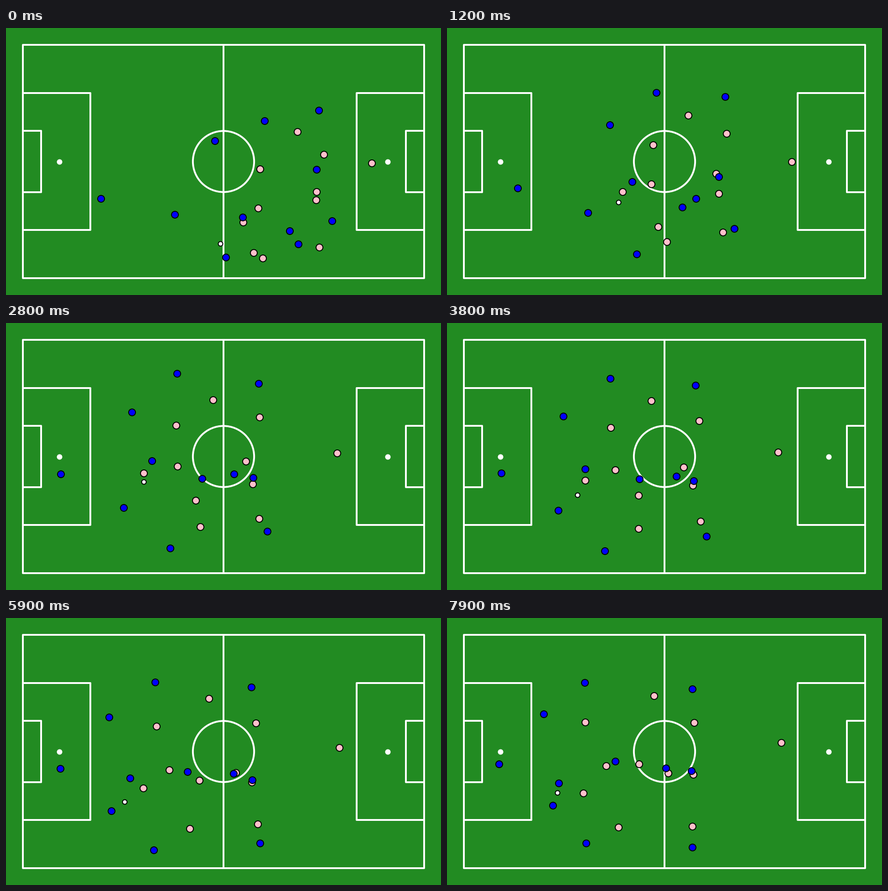
These frames come from a looping animation (954x587 px, 8 s). A matplotlib script:

```python
import matplotlib.pyplot as plt
import numpy as np
from matplotlib.animation import FuncAnimation
from matplotlib.patches import Circle, Rectangle

W, H, DPI = 954, 587, 64
PX = 72 / DPI  # points per pixel
FRAMES, STEP = 80, 100
KEYS = np.array([0, 18, 46, 79])
GRASS = "forestgreen"

span = np.diff(KEYS)
frame = np.arange(FRAMES)
seg = np.clip(np.searchsorted(KEYS, frame, side="right") - 1, 0, 2)
u = (frame - KEYS[seg]) / span[seg]

# everyone sways together: a little back, then forward
sway = np.array([0, -3, 5.5])[seg] * np.sin(np.pi * u)


def path(*points):
    """Smooth motion through four points, one per key time."""
    p = np.array([complex(*q) for q in points])
    s = np.diff(p) / span
    inner = (span[1:] * s[:-1] + span[:-1] * s[1:]) / (span[1:] + span[:-1])
    v = np.array([2 * s[0] - inner[0], *inner, 2 * s[-1] - inner[-1]])
    a, b = seg, seg + 1
    pos = (p[a] * (1 + 2 * u) * (1 - u) ** 2 + p[b] * u * u * (3 - 2 * u)
           + span[a] * u * (1 - u) * (v[a] * (1 - u) - v[b] * u))
    return pos + sway * (0.6 + 1j)


pink = [
    path((802, 297), (740, 292), (728, 284), (733, 274)),
    path((639, 228), (490, 180), (447, 174), (454, 171)),
    path((697, 278), (583, 217), (552, 223), (542, 230)),
    path((557, 310), (413, 239), (349, 235), (303, 229)),
    path((553, 396), (410, 326), (366, 330), (349, 325)),
    path((520, 427), (339, 340), (305, 359), (299, 385)),
    path((681, 360), (557, 308), (515, 328), (485, 341)),
    path((680, 378), (566, 359), (540, 360), (540, 344)),
    path((543, 494), (436, 415), (424, 372), (421, 321)),
    path((563, 506), (453, 458), (416, 457), (376, 460)),
    path((687, 482), (577, 438), (557, 443), (538, 458)),
]
blue = [
    path((208, 375), (137, 343), (120, 330), (114, 321)),
    path((370, 410), (286, 405), (237, 418), (232, 412)),
    path((482, 504), (390, 495), (337, 506), (305, 495)),
    path((458, 248), (319, 202), (243, 212), (212, 211)),
    path((567, 204), (418, 123), (347, 132), (302, 142)),
    path((686, 181), (582, 141), (542, 143), (538, 156)),
    path((519, 416), (364, 314), (292, 336), (245, 363)),
    path((622, 446), (520, 351), (505, 341), (480, 330)),
    path((641, 475), (471, 366), (416, 344), (369, 315)),
    path((681, 311), (567, 333), (542, 352), (536, 336)),
    path((715, 424), (600, 449), (567, 479), (538, 504)),
]
ball = [path((470, 474), (340, 356), (276, 396), (242, 384))]

fig = plt.figure(figsize=(W / DPI, H / DPI), dpi=DPI, facecolor=GRASS)
ax = fig.add_axes([0, 0, 1, 1])
ax.set(xlim=(0, W), ylim=(H, 0))
ax.axis("off")

# pitch of 120 x 70 units with a margin of 5
UNIT = W / 130
CX, CY = W / 2, H / 2
LENGTH, WIDTH = 120 * UNIT, 70 * UNIT
LEFT, RIGHT = CX - LENGTH / 2, CX + LENGTH / 2
LINE = dict(fill=False, ec="white", lw=4 * PX, joinstyle="round")


def box(x, w, h):
    ax.add_patch(Rectangle((x, CY - h / 2), w, h, **LINE))


def dots(fill, edge, size, z):
    return ax.plot([], [], "o", mfc=fill, mec=edge, ms=size * PX,
                   mew=2 * PX, zorder=z)[0]


box(LEFT, LENGTH, WIDTH)
for depth, height in ((20.16, 41), (5.5, 18.32)):
    d, h = depth * UNIT, height * UNIT
    box(LEFT, d, h)
    box(RIGHT - d, d, h)
ax.plot([CX, CX], [CY - WIDTH / 2, CY + WIDTH / 2], color="white", lw=4 * PX)
ax.add_patch(Circle((CX, CY), 9.15 * UNIT, **LINE))
spots = dots("white", "white", 10, 2)
spots.set_data([LEFT + 11 * UNIT, RIGHT - 11 * UNIT], [CY, CY])

layers = [(dots("pink", "black", 15, 3), np.array(pink)),
          (dots("blue", "black", 15, 4), np.array(blue)),
          (dots("white", "black", 10, 5), np.array(ball))]


def update(i):
    for dot, team in layers:
        dot.set_data(team[:, i].real, team[:, i].imag)
    return [dot for dot, _ in layers]


anim = FuncAnimation(fig, update, frames=FRAMES, interval=STEP, repeat=True)
plt.show()
```
